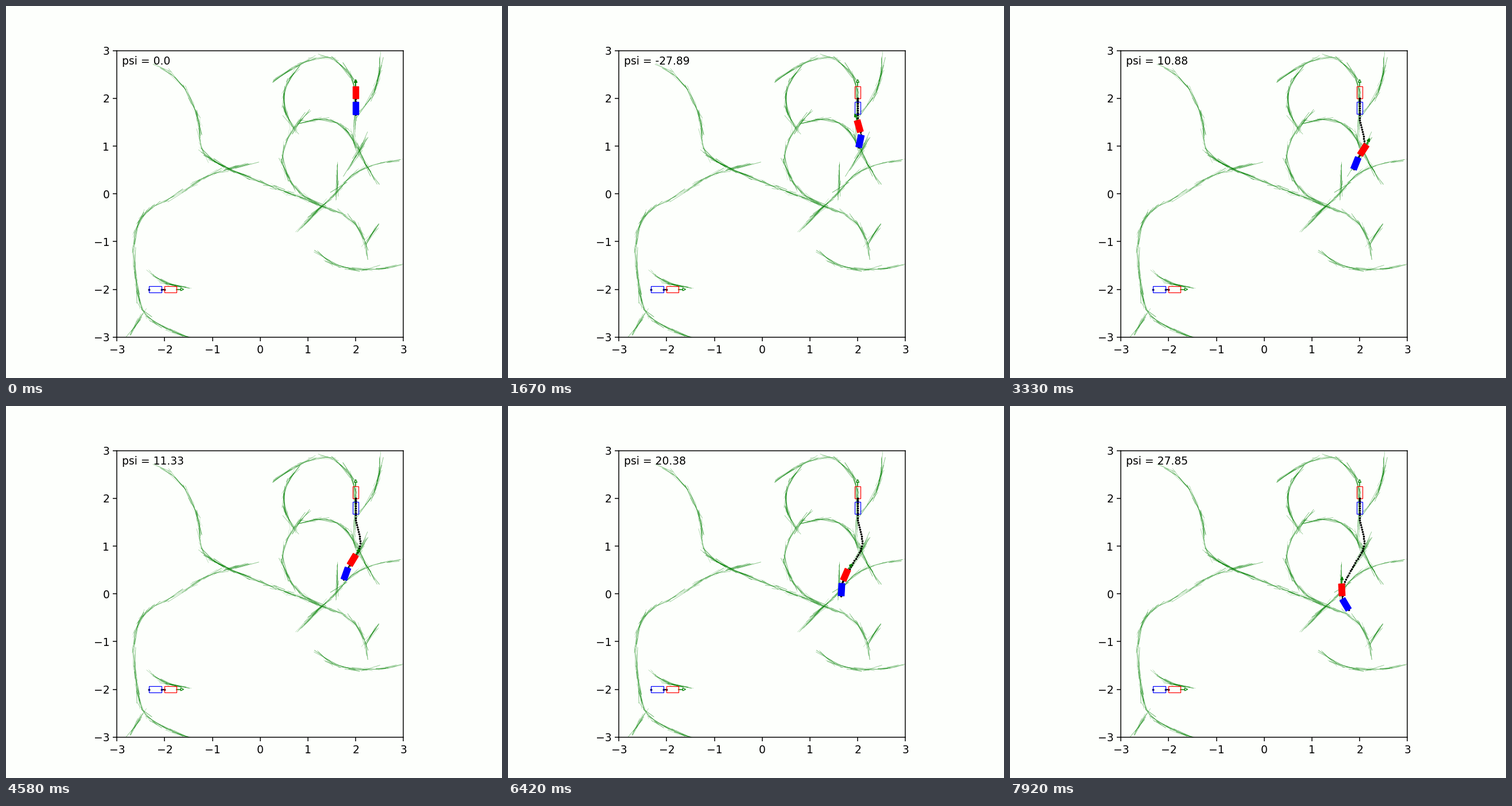
Animation of 864x648 px, one loop 8000 ms. Source, as a matplotlib script:

```python
import numpy as np
import matplotlib.pyplot as plt
from matplotlib.animation import FuncAnimation
from matplotlib.collections import LineCollection
from matplotlib.patches import Polygon

FRAMES = 96
PAPER = "#fdfffc"
CAB, TRAILER, GAP, HALF = 0.25, 0.26, 0.07, 0.064
STEP = 0.05     # distance driven per frame, and between trail dots

rng = np.random.default_rng(11)
plt.rcParams["font.family"] = "DejaVu Sans"
fig = plt.figure(figsize=(6.4, 4.8), dpi=135, facecolor=PAPER)
ax = fig.add_subplot(facecolor=PAPER)
ax.set_aspect("equal")
ax.set_xlim(-3, 3)
ax.set_ylim(-3, 3)
ax.set_xticks(range(-3, 4))
ax.set_yticks(range(-3, 4))

# Key points of the search tree's branches
BRANCHES = [
    [(-2.23, 2.73), (-1.62, 2.25), (-1.3, 1.55), (-1.2, 0.9), (-0.63, 0.52),
     (0.4, 0.1), (1.2, -0.22), (1.95, -0.6), (2.23, -1.3)],
    [(-0.21, 0.63), (-1.1, 0.37), (-1.66, 0.03), (-2.4, -0.4), (-2.63, -0.95),
     (-2.6, -1.8), (-2.45, -2.45), (-2.0, -2.8), (-1.5, -3)],
    [(-2.34, -1.58), (-2.02, -1.84), (-1.55, -1.96)],
    [(0.27, 2.35), (1.29, 2.85), (1.87, 2.5), (2, 1.9), (2.02, 1.05), (2.5, 0.2)],
    [(0.76, 1.31), (0.5, 2.0), (0.81, 2.66)],
    [(1.02, 1.72), (0.5, 0.95), (0.65, 0.25), (1.23, -0.21)],
    [(0.87, 1.49), (1.59, 1.49), (2.01, 0.95)],
    [(2.92, 0.69), (2.07, 0.48), (1.47, -0.09), (0.8, -0.76)],
    [(2.5, 2.84), (2.4, 2.2), (2.05, 1.71)],
    [(2.22, 1.19), (1.85, 0.51)],
    [(1.62, 0.63), (1.59, -0.13)],
    [(1.22, -1.21), (1.9, -1.56), (2.97, -1.49)],
    [(2.49, -0.63), (2.18, -1.06)],
    [(-2.46, -2.5), (-2.72, -2.97)],
]


def unit(deg):
    a = np.radians(deg)
    return np.array([np.cos(a), np.sin(a)])


def smooth(points, n=12):
    """Catmull-Rom curve whose ends keep the bend of their neighbours."""
    p = np.asarray(points, float)
    if len(p) == 2:
        return np.linspace(*p, n)
    p = np.vstack([3 * p[0] - 3 * p[1] + p[2], p, 3 * p[-1] - 3 * p[-2] + p[-3]])
    t = np.linspace(0, 1, n, endpoint=False)[:, None]
    parts = [0.5 * (2 * b + (c - a) * t + (2 * a - 5 * b + 4 * c - d) * t**2
                    + (3 * b - a - 3 * c + d) * t**3)
             for a, b, c, d in zip(p, p[1:], p[2:], p[3:])]
    return np.vstack(parts + [p[-2:-1]])


def draw_tree():
    """Each node along a branch sends out a few straight strokes."""
    strokes = []
    for points in BRANCHES:
        curve = smooth(points)
        gaps = np.hypot(*np.diff(curve, axis=0).T)
        s = np.r_[0, np.cumsum(gaps)]
        slope = np.degrees(np.unwrap(np.arctan2(*np.gradient(curve, axis=0).T[::-1])))
        strokes.extend(zip(curve, curve[1:]))
        for at in np.linspace(0.15, s[-1] - 0.15, max(2, round(s[-1] / 0.15))):
            node = np.array([np.interp(at, s, c) for c in curve.T])
            heading = np.interp(at, s, slope)
            for _ in range(rng.integers(1, 5)):
                d = unit(heading + rng.normal(0, 6)) * rng.uniform(0.12, 0.27)
                shift = rng.normal(0, 0.012, 2) + d * rng.uniform(-0.3, 0.3)
                strokes.append((node + shift - d, node + shift + d))
    n = len(strokes)
    colors = np.zeros((n, 4))
    colors[:, 1] = 0.5
    colors[:, 3] = rng.uniform(0.2, 0.65, n)
    ax.add_collection(LineCollection(strokes, colors=colors, zorder=1,
                                     linewidths=rng.uniform(0.2, 0.55, n)))


def box(back, deg, length):
    u = unit(deg)
    side = HALF * np.array([-u[1], u[0]])
    front = back + length * u
    return [back + side, front + side, front - side, back - side]


class Rig:
    """Cab with a trailer on a hitch and an arrow for the steered wheel."""

    def __init__(self, filled, z):
        def poly(color, z):
            return ax.add_patch(Polygon(np.zeros((4, 2)), ec=color, lw=0.65, zorder=z,
                                        fc=color if filled else "none"))

        dots = dict(color="k", marker="o", ms=2, mew=0, lw=0.9, zorder=z + 0.1)
        self.shaft, = ax.plot([], [], color="green", lw=0.8, zorder=z)
        self.head = poly("green", z)
        self.joint, = ax.plot([], [], **dots)
        self.axle, = ax.plot([], [], **dots)
        self.trailer = poly("blue", z + 0.2)
        self.cab = poly("red", z + 0.2)

    def place(self, rear, heading, psi, steer):
        rear = np.asarray(rear, float)
        u, w = unit(heading), unit(heading + steer)
        hitch = rear - GAP * u
        end = hitch - TRAILER * unit(heading + psi)
        nose = rear + CAB * u
        neck = nose + 0.085 * w
        side = 0.03 * np.array([-w[1], w[0]])
        self.cab.set_xy(box(rear, heading, CAB))
        self.trailer.set_xy(box(end, heading + psi, TRAILER))
        self.joint.set_data(*np.array([rear, hitch]).T)
        self.axle.set_data([end[0]], [end[1]])
        self.shaft.set_data(*np.array([nose, neck]).T)
        self.head.set_xy([neck + side, neck + 0.062 * w, neck - side])


# The cab's heading over the distance reversed; its integral is the track
DS = 0.004
S = np.arange(0, 2.2, DS)
HEADING = np.interp(S, [0, 0.38, 0.6, 0.72, 0.93, 1.19, 1.46, 1.74, 1.98, 2.156],
                    [90, 90, 105, 106, 90, 57, 59, 61, 77, 93])
TRACK = np.array([2, 2]) - np.cumsum(unit(HEADING), axis=1).T * DS
STEER = -0.2 * np.convolve(np.gradient(HEADING, DS), np.ones(25) / 25, "same")


def on_track(s):
    return np.stack([np.interp(s, S, c) for c in TRACK.T], -1)


# Ends of the driving legs: frame, distance reversed, trailer angle
LEGS = np.array([(0, 0, 0), (20, 0.704, -27.89), (39, 1.205, 10.88),
                 (54, 1.456, 11.33), (68, 1.983, 30.43), (70, 2.06, 33.6),
                 (86, 1.93, 19.75), (95, 2.156, 27.85)])


def pose(i):
    """Time a leg does not need for backing up is spent pulling forward."""
    leg = min(np.searchsorted(LEGS[:, 0], i, "right"), len(LEGS) - 1)
    (t0, s0, a0), (t1, s1, a1) = LEGS[leg - 1:leg + 1]
    u = (i - t0) / (t1 - t0)
    pull = 0.2 * max(0, (t1 - t0) * STEP - (s1 - s0)) * np.sin(np.pi * u)**2
    return s0 + (s1 - s0) * u - pull, a0 + (a1 - a0) * u - 40 * pull


DRIVE = np.array([pose(i) for i in range(FRAMES)])
REACH = np.maximum.accumulate(DRIVE[:, 0])

draw_tree()
Rig(False, 2).place((-2, -2), 0, 0, 0)
Rig(False, 2).place((2, 2), 90, 0, 0)
truck = Rig(True, 4)
trail, = ax.plot([], [], "ko", ms=1.9, mew=0, zorder=3)
label = ax.text(-2.9, 2.71, "", zorder=5)


def update(i):
    dist, psi = DRIVE[i]
    truck.place(on_track(dist), np.interp(dist, S, HEADING), psi,
                np.interp(dist, S, STEER))
    trail.set_data(*on_track(np.arange(0, REACH[i] + DS, STEP)).T)
    label.set_text(f"psi = {round(float(psi), 2)}")
    return truck.cab, truck.trailer, trail, label


anim = FuncAnimation(fig, update, frames=FRAMES, init_func=lambda: update(0),
                     interval=8000 / FRAMES, repeat=True, repeat_delay=0)
plt.show()
```
